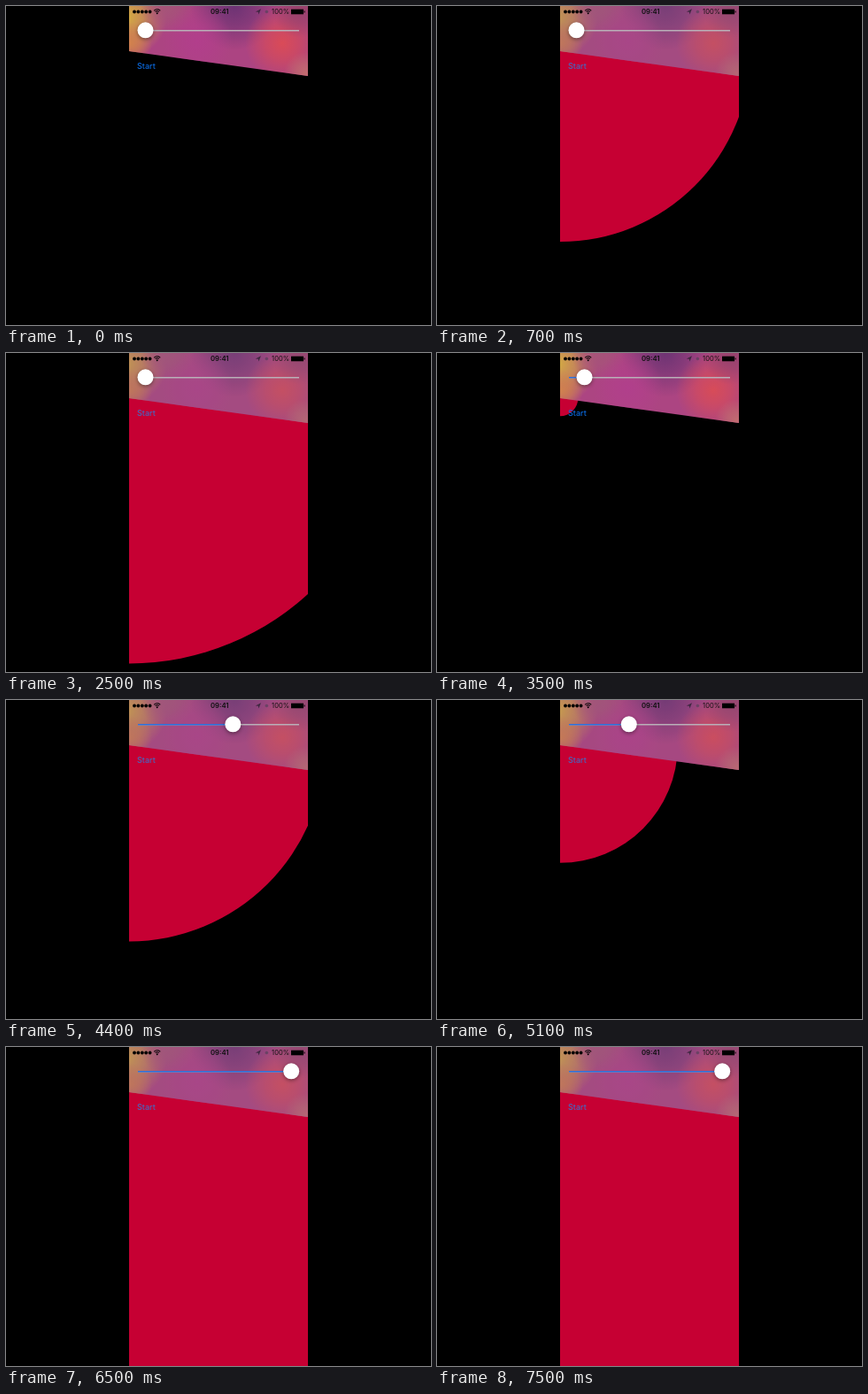
Animation of 480 by 360 pixels, one loop 7600 ms. Source, as an HTML page with a canvas:

```html
<!DOCTYPE html>
<html lang="en">
<head>
<meta charset="utf-8">
<style>
  html, body { margin: 0; width: 100%; height: 100%; overflow: hidden; background: #000; }
  canvas { display: block; }
</style>
</head>
<body>
<canvas id="stage" width="480" height="360"></canvas>
<script>
const ctx = document.getElementById('stage').getContext('2d');
const LOOP = 7600, STEP = 100;
const LEFT = 139, RIGHT = 341, ORIGIN_Y = 51, MAX_R = 369;
const FONT = 'Inter, "Liberation Sans", sans-serif';

// Slider value by time while it is dragged.
const drag = [
  [3400, 0], [3500, .055], [3700, .18], [4000, .41], [4300, .585], [4400, .6],
  [4600, .57], [4800, .5], [5100, .36], [5400, .42], [5600, .567],
  [5700, .801], [5800, .91], [6000, 1]
];

// Wallpaper glows: x, y, radius, colour.
const glows = [
  [136, 12, 46, '215,180,60'], [141, 42, 24, '210,130,75'],
  [182, 2, 30, '165,85,120'], [258, 0, 50, '105,50,115'],
  [216, 40, 40, '178,62,140'], [312, 42, 42, '220,75,85'],
  [332, 4, 32, '150,65,105'], [338, 76, 24, '195,110,110']
];

const clamp = v => Math.min(1, Math.max(0, v));

function track(keys, t) {
  if (t <= keys[0][0]) return keys[0][1];
  for (let i = 1; i < keys.length; i++) {
    const [t0, a] = keys[i - 1], [t1, b] = keys[i];
    if (t <= t1) return a + (b - a) * (t - t0) / (t1 - t0);
  }
  return keys[keys.length - 1][1];
}

function expand(t, start) {
  const p = clamp((t - start) / 900);
  return p * p * (3 - 2 * p);
}

function reveal(t, value) {
  if (t >= 3400) return value;
  return t < 1830 ? expand(t, 200) : expand(t, 1850);
}

function disc(x, y, r, fill) {
  ctx.fillStyle = fill;
  ctx.beginPath();
  ctx.arc(x, y, r, 0, 7);
  ctx.fill();
}

function line(x0, x1, y, color) {
  ctx.strokeStyle = color;
  ctx.lineWidth = 1.5;
  ctx.beginPath();
  ctx.moveTo(x0, y);
  ctx.lineTo(x1, y);
  ctx.stroke();
}

function polygon(points, fill) {
  ctx.fillStyle = fill;
  ctx.beginPath();
  points.forEach(p => ctx.lineTo(...p));
  ctx.closePath();
  ctx.fill();
}

function text(s, x, y, font, fill, align = 'left') {
  ctx.font = font + ' ' + FONT;
  ctx.fillStyle = fill;
  ctx.textAlign = align;
  ctx.fillText(s, x, y);
}

function header(cover) {
  const edge = [[LEFT, 0], [RIGHT, 0], [RIGHT, 79], [LEFT, ORIGIN_Y]];
  ctx.save();
  polygon(edge, 'rgb(172,68,130)');
  ctx.clip();
  for (const [x, y, r, rgb] of glows) {
    const g = ctx.createRadialGradient(x, y, 0, x, y, r);
    g.addColorStop(0, `rgba(${rgb},.95)`);
    g.addColorStop(.45, `rgba(${rgb},.6)`);
    g.addColorStop(1, `rgba(${rgb},0)`);
    ctx.fillStyle = g;
    ctx.fillRect(LEFT, 0, RIGHT - LEFT, 80);
  }
  ctx.fillStyle = `rgba(145,90,125,${.3 * cover})`;
  ctx.fillRect(LEFT, 0, RIGHT - LEFT, 80);
  ctx.restore();
}

function statusBar() {
  for (let i = 0; i < 5; i++) disc(145 + i * 4.4, 6.5, 1.9, '#000');
  ctx.strokeStyle = '#000';
  ctx.lineWidth = 1.1;
  for (const r of [2.8, 4.8]) {
    ctx.beginPath();
    ctx.arc(170.7, 8.6, r, -Math.PI * .76, -Math.PI * .24);
    ctx.stroke();
  }
  disc(170.7, 8.2, 1, '#000');
  text('09:41', 241.3, 9.2, '600 7.7px', '#111', 'center');
  polygon([[281.8, 6.4], [288, 3.2], [285.4, 9.6], [284.8, 6.8]], 'rgba(50,35,55,.85)');
  disc(294.4, 6.5, 1.8, 'rgba(95,65,95,.8)');
  text('100%', 320, 9.2, '7.5px', '#111', 'right');
  ctx.fillStyle = '#000';
  ctx.fillRect(322, 3.7, 14, 5.6);
  ctx.fillRect(336.6, 5.5, 1, 2);
}

function slider(value) {
  const x = 157.5 + 164.7 * value;
  line(149, 331, 27.7, '#b9b0b8');
  line(149, x, 27.7, '#2b6fdc');
  ctx.save();
  ctx.shadowColor = 'rgba(0,0,0,.4)';
  ctx.shadowBlur = 4;
  ctx.shadowOffsetY = 1.5;
  disc(x, 27.3, 9, '#fff');
  ctx.restore();
}

function draw(t) {
  const value = track(drag, t), open = reveal(t, value);
  ctx.fillStyle = '#000';
  ctx.fillRect(0, 0, 480, 360);

  ctx.save();
  ctx.beginPath();
  ctx.rect(LEFT, 0, RIGHT - LEFT, 360);
  ctx.clip();
  // The full circle overshoots the corner slightly to cover its soft edge.
  if (open > 0) disc(LEFT, ORIGIN_Y, open * MAX_R + (open === 1 ? 2 : 0), '#c60033');
  header(clamp(open * 2));
  ctx.restore();

  statusBar();
  slider(value);
  text('Start', 148, 71, '500 9px', open > .1 ? '#4964bd' : '#0b68dc');
}

function frame(now) {
  draw(Math.floor(now % LOOP / STEP) * STEP);
  requestAnimationFrame(frame);
}
requestAnimationFrame(frame);
</script>
</body>
</html>
```
